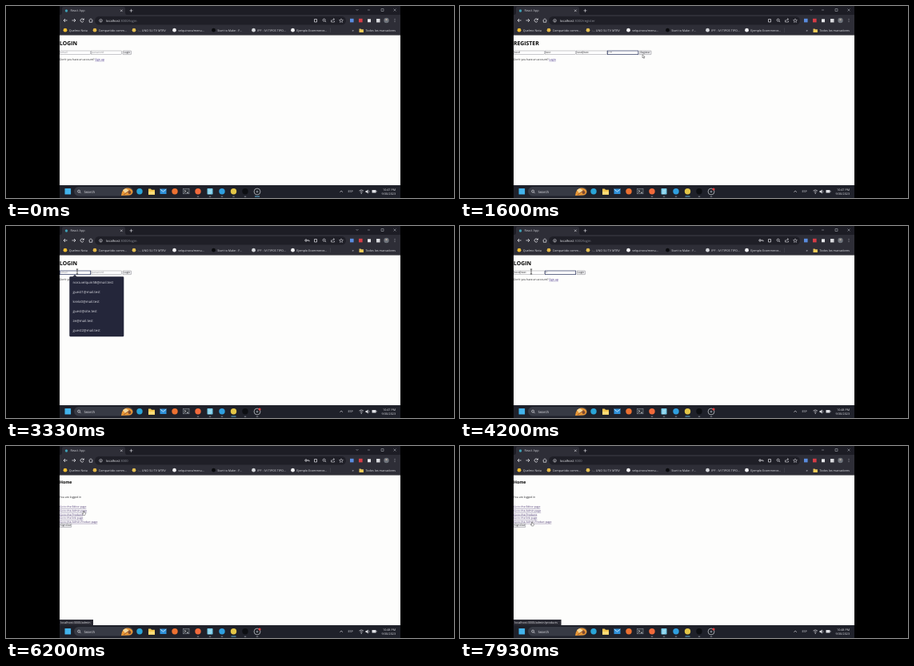
An HTML page that plays this animation: 560 px wide and 240 px high, repeating every 8 s.

```html
<!DOCTYPE html>
<html lang="es">
<head>
<meta charset="utf-8">
<title>Login demo</title>
<style>
html, body { margin: 0; width: 100%; height: 100%; overflow: hidden; background: #000; }
svg { display: block; width: 100vw; height: 100vh; font-family: "Open Sans", "Noto Sans", sans-serif; text-rendering: geometricPrecision; }
text { white-space: pre; }
</style>
</head>
<body>
<svg id="stage" viewBox="0 0 560 240">
  <clipPath id="screen"><rect x="67" width="426" height="240"/></clipPath>
  <g clip-path="url(#screen)">
    <g id="chrome"></g><g id="view"></g><g id="cursor"></g>
  </g>
</svg>
<script>
const LOOP = 8000, STEP = 1000 / 15;
const PALE = '#e2e3e8', INK = '#1c1c20';
const $ = id => document.getElementById(id);

const rect = (x, y, w, h, fill, more = '') =>
  `<rect x="${x}" y="${y}" width="${w}" height="${h}" fill="${fill}" ${more}/>`;
const dot = (x, y, r, fill, more = '') =>
  `<circle cx="${x}" cy="${y}" r="${r}" fill="${fill}" ${more}/>`;
const line = (d, color = PALE, w = .7) =>
  `<path d="${d}" fill="none" stroke="${color}" stroke-width="${w}"/>`;
const shape = (d, fill, more = '') => `<path d="${d}" fill="${fill}" ${more}/>`;
const ring = (x, y, r, color = PALE, w = .6) => dot(x, y, r, 'none', `stroke="${color}" stroke-width="${w}"`);
const label = (x, y, size, str, fill = INK, more = '') =>
  `<text x="${x}" y="${y}" font-size="${size}" fill="${fill}" ${more}>${str}</text>`;
const lens = (x, y) => ring(x - .4, y - .4, 1.5, PALE, .7) + line(`M${x + .7} ${y + .7}l1.4 1.4`);

function drawWindow() {
  let s = rect(67, 0, 426, 11, '#1d1d25')
    + shape('M68 11Q70 11 70 8V3Q70 1 72 1H147Q149 1 149 3V8Q149 11 151 11Z', '#2e2e37')
    + rect(67, 11, 426, 25.5, '#2e2e37')
    + rect(111, 13, 314, 10.5, '#1f1f27', 'rx="5.2"')
    + rect(67, 36.5, 426, 188, '#fdfdfc');
  // tab strip and window buttons
  s += dot(75.5, 6, 1.7, '#3f9fb5') + label(80.5, 7.4, 3.9, 'React App', '#c6c8ce')
    + line('M143 4.5l2.6 2.6m0-2.6l-2.6 2.6M154.5 5.8h4m-2-2v4', PALE, .6)
    + line('M437.5 4l1.5 1.5l1.5-1.5M452 5h3M469 3.5h3v3h-3zM484.5 3.5l3 3m0-3l-3 3', '#a3a6ae', .6);
  // navigation
  s += line('M76.5 18h-4.5m2-2l-2 2l2 2M82.5 18h4.5m-2-2l2 2l-2 2', PALE, .8)
    + line('M97 17a2.1 2.1 0 1 0 0 2M97.3 15.5v1.8h-1.8', PALE, .8)
    + line('M103.5 18l2.5-2.2l2.5 2.2M104.3 17.8v2.5h3.4v-2.5')
    + ring(118.5, 18.3, 1.8) + line('M118.5 18v1.3')
    + line('M385.5 16.5h3v3.5h-3z') + lens(398, 18)
    + line('M406.5 17.5v2.5h4v-1.5M407.5 18.5q.5-2 3-2m-1.3-1.2l1.3 1.2l-1.3 1.2', PALE, .6)
    + line('M419 15.8l.7 1.6l1.7.2l-1.3 1.1l.4 1.7l-1.5-.9l-1.5.9l.4-1.7l-1.3-1.1l1.7-.2z', PALE, .5)
    + rect(430, 15.8, 4.6, 4.6, '#5a8de0') + rect(441, 15.8, 4.6, 4.6, '#d83c45')
    + rect(452, 16.3, 4, 4, '#e6e7ea') + rect(463, 16, 4.5, 4.5, '#d9dade')
    + dot(475.5, 18, 3.2, '#6f747c') + dot(475.5, 17.2, 1.1, '#b9a99d')
    + [16.3, 18, 19.7].map(y => dot(486, y, .45, PALE)).join('');
  // bookmarks
  const marks = [
    [74, '#f0bd32', 'Quelmo Nota'], [111, '#e2b747', 'Compartido comm...'],
    [160, '#e3bf53', '-... UNO SU TV MTRV'], [210.5, '#f2f2f4', 'velquinora/menu...'],
    [259.5, '#090a0d', 'Start to Make - F...'], [309.5, '#d5d7db', 'IPF - IVI TIPOS TIPO...'],
    [358.5, '#f2f2f4', 'Ejemplo Ecommerce...']];
  for (const [x, color, name] of marks)
    s += dot(x, 30.2, 2.4, color) + label(x + 4.7, 31.5, 3.7, name, PALE);
  s += line('M405.5 27.5v5.5', '#55575f', .4) + label(432.5, 31.5, 4.5, '»', PALE)
    + shape('M441.5 28.5h2l.7.8h2.7v3.6h-5.4z', '#efcb59')
    + label(449.5, 31.5, 3.7, 'Todos los marcadores', PALE);
  return s + drawTaskbar();
}

function drawTaskbar() {
  let s = rect(67, 224, 426, 16, '#1f212a')
    + rect(73.5, 228, 7.6, 7.6, '#43b4ec', 'rx=".6"')
    + rect(85, 226, 74, 11.5, '#373a44', 'rx="5.7"')
    + lens(91.5, 232) + label(97.5, 233.6, 4.4, 'Search', PALE)
    + shape('M144 237q1-9 7-9.5q7 0 7.5 5q-1 4-5 4z', '#e99736')
    + shape('M146 230l4-2l4 3l-5 3z', '#f5d79b') + dot(154.5, 233, 2, '#7b4930') + line('M147 236l8-6', '#8a4d2c', .8);
  const apps = [[167, '#2aa5d8'], [211, '#ed7131'], [240, '#f26a3b'], [270, '#2f9fe0'], [284.5, '#e3c646'], [299, '#0c0e12']];
  for (const [x, color] of apps) s += dot(x, 231.7, 3.7, color);
  s += shape('M178 228.5h3l1 1.2h4v6h-8z', '#f4c64d') + rect(178, 232, 8, 3.7, '#ffdd79')
    + rect(192.5, 228.5, 8, 6.5, '#2f91da') + line('M192.7 229l3.8 3l3.8-3', '#dff1ff', .8)
    + rect(221.5, 228.3, 7.5, 6.5, '#30343b', 'stroke="#9ba3ad" stroke-width=".5"') + line('M223 230l1.7 1.5l-1.7 1.5m3 .3h2', '#fff')
    + rect(251.5, 228, 7, 7.5, '#75cbe9', 'rx=".7"') + line('M253 230.5h4m-4 2h4m-4 2h3', '#e9faff', .6)
    + dot(314, 232, 3.9, '#171a20', 'stroke="#c4c8ce" stroke-width=".8"') + dot(314, 232, 1.5, '#737983');
  for (const x of [240, 255, 270, 299]) s += rect(x - 1.2, 237.8, 2.4, .7, '#a9b0b8');
  return s + line('M417.5 232.7l1.7-1.7l1.7 1.7') + label(427.5, 233.4, 3.7, 'ESP', PALE)
    + line('M441.5 231q2.7-2.3 5.4 0M442.7 232.4q1.5-1.3 3 0') + dot(444.2, 234, .7, PALE)
    + shape('M449.5 231h1.3l1.7-1.5v5l-1.7-1.5h-1.3z', PALE) + line('M453.5 230.5q1.3 1.5 0 3', PALE, .5)
    + rect(457.5, 230, 5, 3.5, PALE, 'rx=".6"') + rect(462.8, 231, .6, 1.5, PALE);
}

function field(x, y, w, value, hint, focus) {
  const border = focus ? 'stroke="#414a70" stroke-width=".8"' : 'stroke="#77777f" stroke-width=".4"';
  return rect(x, y, w, 4.6, '#fff', border)
    + label(x + .8, y + 3.4, 3.3, value || hint, value ? INK : '#85858c');
}
const button = (x, y, w, str) => rect(x, y, w, 4.6, '#efeff1', 'rx=".5" stroke="#66666f" stroke-width=".4"')
  + label(x + w / 2, y + 3.4, 3.2, str, INK, 'text-anchor="middle"');

function form({ page, values, focus, error }) {
  const dy = error ? 5 : 0, top = 56 + dy, login = page === 'login';
  const hints = login ? ['email', 'password'] : ['name', 'username', 'email', 'password'];
  const xs = [67.3, 106.3, 145.5, 184.5];
  let s = error ? label(67, 40.2, 3.3, 'Password invalid') : '';
  s += label(67, 48.7 + dy, 6.85, login ? 'LOGIN' : 'REGISTER', '#000', 'font-weight="700"');
  hints.forEach((hint, i) => s += field(xs[i], top, 38.3, values[i], hint, focus === i));
  s += login ? button(146, top, 10.5, 'Login') : button(224, top, 15, 'Register');
  return s + label(67, 67.8 + dy, 3.4, "Don't you have an account? "
    + `<tspan fill="#3c2880" text-decoration="underline">${login ? 'Sign up' : 'Login'}</tspan>`);
}

const links = ['Editor page', 'Admin page', 'Products', 'link page', 'Admin Product page'];
function home() {
  return label(67, 46.6, 5.2, 'Home', '#000', 'font-weight="700"')
    + label(67, 64.5, 3.4, 'You are logged in')
    + links.map((name, i) => label(67, 77.3 + i * 4.65, 3.36, 'Go to the ' + name, '#47336f', 'text-decoration="underline"')).join('')
    + button(67.2, 97, 14.5, 'Sign Out');
}

function suggestions(x, w, tip, items) {
  return shape(`M${tip - 3} 63.5l3-2.5l3 2.5z`, '#24263a')
    + rect(x, 63.3, w, 3 + items.length * 12, '#24263a', 'rx="1.2"')
    + items.map((item, i) => label(x + 4.3, 72.2 + i * 12, 4.25, item, PALE)).join('');
}
const mails = ['nora.velquin58@mail.test', 'guest1@mail.test', 'krelo0@mail.test', 'guest@site.test', 'ze@mail.test', 'guest2@mail.test'];

function warning() {
  const body = ['La contraseña que acabas de usar se ha encontrado en una brecha de',
    'seguridad de datos. El Gestor de contraseñas de Quelmo te recomienda que', 'cambies tu contraseña ahora.'];
  return rect(205.3, 24.5, 149.5, 101.5, '#27272e', 'rx="2"')
    + line('M206 36q9-2 10 5t11 5q9-2 13 6t22 8q14-1 19-7q6-6 13-2t14-5q5-5 0-12t6-9', '#5b5d67', .6)
    + line('M286 25q4 9 14 9t14-9', '#5b5d67', .6)
    + ring(222.5, 42, 2, '#666973') + line('M342 46l2-1.5l2 1.5', '#666973')
    + shape('M254.5 39.5l7.8 12.5h-15.6z', '#f0a09a', 'stroke="#f0a09a" stroke-linejoin="round"')
    + line('M254.5 44v4', '#34252a', 1.2) + dot(254.5, 50, .7, '#34252a')
    + [264.5, 269.5, 274.5].map(x => dot(x, 46.5, 1.2, PALE)).join('') + line('M278 44.5v4')
    + label(211, 74.8, 4.6, 'Cambia la contraseña', '#f1f2f5')
    + body.map((str, i) => label(211, 86.6 + i * 6.7, 3.7, str, '#9c9fa8')).join('')
    + ring(214.2, 115, 2, '#a5a8b0', .5) + line('M214.2 114.5v1.6', '#a5a8b0', .5)
    + rect(324, 109.5, 26, 11, '#8ab8f2', 'rx="1.2"')
    + label(337, 116.4, 3.9, 'Aceptar', '#263754', 'text-anchor="middle"');
}

// Each entry overrides part of the state from its time onwards.
const empty = { values: [], focus: -1, menu: '', error: false, dialog: false };
const script = [
  [0, { page: 'login', ...empty, path: '/login', hover: '' }],
  [400, { page: 'register', path: '/register' }],
  [600, { focus: 0 }],
  [667, { values: ['test1'] }],
  [800, { focus: 1 }],
  [860, { values: ['test1', 'test'], menu: 'names' }],
  [1130, { menu: '', focus: 2 }],
  [1260, { values: ['test1', 'test', 'test@test'] }],
  [1400, { focus: 3, values: ['test1', 'test', 'test@test', '••••'] }],
  [1660, { page: 'home', path: '', ...empty, key: true }],
  [1930, { dialog: true }],
  [2660, { dialog: false }],
  [2990, { page: 'login', path: '/login', ...empty }],
  [3190, { focus: 0, menu: 'mails' }],
  [3590, { menu: '', values: ['test'] }],
  [3790, { values: ['test@test'] }],
  [4060, { focus: 1 }],
  [4190, { values: ['test@test', '••'] }],
  [4390, { error: true }],
  [4790, { values: ['test@test', '•'] }],
  [5260, { values: ['test@test', '••••'] }],
  [5590, { page: 'home', path: '', ...empty }],
  [5990, { hover: '/admin' }],
  [6660, { hover: '/products' }],
  [7060, { hover: '/link' }],
  [7400, { hover: '/admin/products' }]
];
const stateAt = t => Object.assign({}, ...script.filter(([at]) => at <= t + 1).map(([, change]) => change));

// time, x, y, pointer kind
const moves = [
  [0, 155, 160, 'none'], [130, 145, 120, 'arrow'], [330, 117, 67, 'hand'], [400, 112, 66, 'arrow'],
  [600, 78, 57, 'text'], [1460, 78, 57, 'text'], [1560, 231, 59, 'arrow'], [1730, 210, 72, 'arrow'],
  [2130, 77, 95, 'arrow'], [2990, 77, 95, 'arrow'], [3190, 89, 57, 'text'], [4200, 89, 57, 'text'],
  [4330, 151, 58, 'arrow'], [4600, 99, 62, 'text'], [5400, 99, 62, 'text'], [5530, 151, 64, 'arrow'],
  [5990, 97, 81.5, 'hand'], [6460, 97, 81.5, 'hand'], [6660, 90, 86, 'hand'], [7060, 90, 91, 'hand'],
  [7400, 90, 95, 'hand'], [LOOP, 90, 95, 'hand']
];
function pointer(t) {
  const i = moves.findIndex(m => m[0] > t), a = moves[i - 1], b = moves[i];
  const p = (t - a[0]) / (b[0] - a[0]), e = p * p * (3 - 2 * p);
  const outline = 'stroke="#222" stroke-width=".4"';
  const kinds = {
    none: '',
    arrow: shape('M0 0v4l1-.9l.7 1.6l.8-.4l-.7-1.5h1.3z', '#fff', outline),
    hand: shape('M-.4 0q.6-.6 1 0v1.6l1.7.5v1.7l-.6 1.2h-2.1l-1.4-2q.2-.6 1.4.3z', '#fff', outline),
    text: line('M-1.2-3h2.4M0-3v6M-1.2 3h2.4', '#222', .7)
  };
  return `<g transform="translate(${a[1] + (b[1] - a[1]) * e} ${a[2] + (b[2] - a[2]) * e})">${kinds[a[3]]}</g>`;
}

function view(t) {
  const s = stateAt(t), recording = t > 130;
  let out = label(125, 19.8, 4.1, `localhost<tspan fill="#8b8e97">:3000${s.path}</tspan>`, '#f0f1f4');
  if (s.key) out += ring(375, 18, 1.2, PALE, .8) + line('M376.2 18h2.8v1.3', PALE, .8);
  out += s.page === 'home' ? home() : form(s);
  if (s.menu === 'names') out += suggestions(118.3, 52.5, 125, ['test1', 'test']);
  if (s.menu === 'mails') out += suggestions(79.3, 68, 86, mails);
  if (s.dialog) out += warning();
  if (s.hover) {
    const url = 'localhost:3000' + s.hover;
    out += rect(67, 217, 3 + url.length * 1.95, 7, '#2a2a33') + label(68.3, 221.7, 3.7, url, PALE);
  }
  out += recording
    ? rect(281.5, 237.6, 6, .9, '#65bde9') + rect(312.8, 237.8, 2.4, .7, '#a9b0b8') + dot(317, 229, 1.6, '#e33f3f')
    : rect(283.3, 237.8, 2.4, .7, '#a9b0b8') + rect(311, 237.6, 6, .9, '#65bde9');
  const clock = t < 3990 ? '10:47 PM' : '10:48 PM';
  return out + label(487, 230.7, 3.7, clock, PALE, 'text-anchor="end"')
    + label(487, 236.2, 3.7, '9/30/2023', PALE, 'text-anchor="end"');
}

$('chrome').innerHTML = drawWindow();
let shown = -1;
function tick() {
  const step = Math.floor(performance.now() % LOOP / STEP);
  if (step !== shown) {
    shown = step;
    $('view').innerHTML = view(step * STEP);
    $('cursor').innerHTML = pointer(step * STEP);
  }
  requestAnimationFrame(tick);
}
tick();
</script>
</body>
</html>
```
